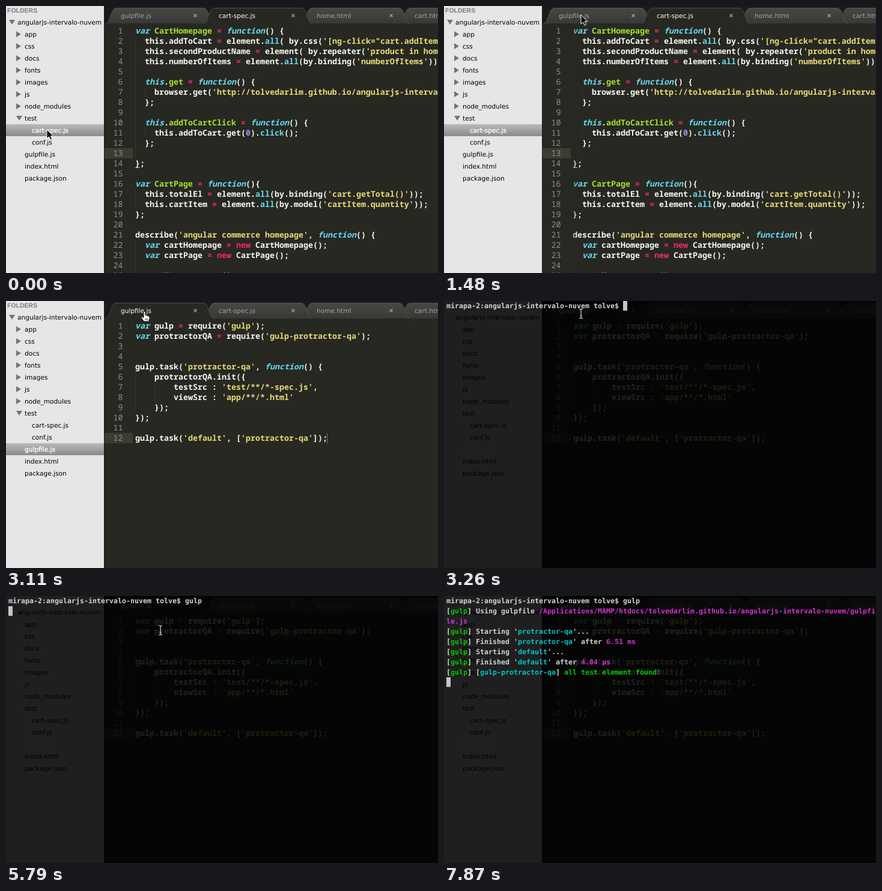
These frames come from a looping animation (719x445 px, 8 s). An HTML page:

```html
<!DOCTYPE html>
<html lang="en">
<head>
<meta charset="utf-8">
<title>Editor and terminal</title>
<style>
html, body { margin: 0; width: 100%; height: 100%; overflow: hidden; background: #272822; }
svg { display: block; }
text { white-space: pre; text-rendering: geometricPrecision; }
.ui { font: 10.6px "DejaVu Sans", sans-serif; }
.head { font: bold 10.5px "Liberation Sans", sans-serif; fill: #7b7b7b; }
.code { font: 600 13.333px "Noto Sans Mono", monospace; fill: #f8f8f2; }
.term { font: bold 11.63px "DejaVu Sans Mono", monospace; fill: #d2d2d2; }
.num { font-weight: 500; fill: #8f908a; text-anchor: end; }
.str { fill: #e6db74; }
.key { fill: #66d9ef; font-style: italic; }
.op { fill: #f92672; }
.lib { fill: #66d9ef; }
.name { fill: #a6e22e; }
.lit { fill: #ae81ff; }
.guide { stroke: #4c4d46; stroke-dasharray: 1 2; }
.green { fill: #00c800; }
.cyan { fill: #00c5c7; }
.pink { fill: #d033ce; }
</style>
</head>
<body>
<svg id="stage" width="719" height="445" viewBox="0 0 719 445"></svg>
<script>
const PROJECT = 'angularjs-intervalo-nuvem', USER = 'tolve', SITE = 'tolvedarlim.github.io';
const LOOP = 8000;

const SPEC = `var CartHomepage = function() {
  this.addToCart = element.all( by.css('[ng-click="cart.addItem(
  this.secondProductName = element( by.repeater('product in homepage
  this.numberOfItems = element.all(by.binding('numberOfItems'));

  this.get = function() {
    browser.get('http://${SITE}/${PROJECT}/
  };

  this.addToCartClick = function() {
    this.addToCart.get(0).click();
  };

};

var CartPage = function(){
  this.totalEl = element.all(by.binding('cart.getTotal()'));
  this.cartItem = element.all(by.model('cartItem.quantity'));
};

describe('angular commerce homepage', function() {
  var cartHomepage = new CartHomepage();
  var cartPage = new CartPage();

  cartHomepage.get();`;

const GULP = `var gulp = require('gulp');
var protractorQA = require('gulp-protractor-qa');


gulp.task('protractor-qa', function() {
    protractorQA.init({
        testSrc : 'test/**/*-spec.js',
        viewSrc : 'app/**/*.html'
    });
});

gulp.task('default', ['protractor-qa']);`;

const span = (cls, s) => `<tspan class="${cls}">${s}</tspan>`;
const text = (cls, x, y, s, more = '') => `<text class="${cls}" x="${x}" y="${y}" ${more}>${s}</text>`;
const rect = (x, y, w, h, fill, more = '') => `<rect x="${x}" y="${y}" width="${w}" height="${h}" fill="${fill}" ${more}/>`;
const path = (d, fill, more = '') => `<path d="${d}" fill="${fill}" ${more}/>`;

const TOKEN = /('[^']*'?)|\b(var|function|this(?=\.\w+ = function))\b|(=|\bnew\b)|\b(all|click)\b(?=\()|(\b\w+(?= = function))|\b(\d)\b/g;
const KINDS = ['str', 'key', 'op', 'lib', 'name', 'lit'];
const paint = line => line.replace(TOKEN, (s, ...m) => span(KINDS[m.slice(0, 6).findIndex(Boolean)], s));

const lineY = n => 46 + 17 * (n - 1);
const guide = ([x, from, to]) =>
  path(`M${x + .5} ${lineY(from) - 13}V${lineY(to) + 4}`, 'none', 'class="guide"');

function pane(id, source, current, guides, extra = '') {
  const lines = source.split('\n');
  const nums = lines.map((_, i) => text('code num', 194.5, lineY(i + 1), i + 1)).join('');
  const body = lines.map((s, i) => text('code', 215, lineY(i + 1), paint(s))).join('');
  return `<g id="${id}">${rect(164, lineY(current) - 13, 47, 17, '#3d3c34')}${nums}
    <g class="body">${guides.map(guide).join('')}${body}${extra}</g></g>`;
}

function tab(i, title, active) {
  const x = 166 + 163 * i;
  const shape = `M${x} 29C${x + 9} 28 ${x + 7} 3.5 ${x + 18} 3.5H${x + 162}C${x + 173} 3.5 ${x + 171} 28 ${x + 180} 29`;
  return path(shape, active ? '#272822' : 'url(#tabFill)', `stroke="${active ? '#4b4c46' : '#545452'}"`) +
    text('ui', x + 25, 20, title, `fill="${active ? '#fff' : '#a4a4a2'}"`) +
    path(`M${x + 146.5} 13.5l5 5m0-5l-5 5`, 'none', 'stroke="#a4a4a2" stroke-width="1.3"');
}

function tabs(id, active) {
  const parts = ['gulpfile.js', 'cart-spec.js', 'home.html', 'cart.html'].map((s, i) => tab(i, s, i === active));
  const front = parts.splice(active, 1);
  return `<g id="${id}">${parts.reverse().join('')}${front}</g>`;
}

// Each row: name, indent, arrow state
const ROWS = [[PROJECT, 19, 'open'],
  ...['app', 'css', 'docs', 'fonts', 'images', 'js', 'node_modules'].map(s => [s, 31, 'shut']),
  ['test', 31, 'open'], ['cart-spec.js', 43], ['conf.js', 43],
  ['gulpfile.js', 31], ['index.html', 31], ['package.json', 31]];
const rowY = i => 27 + 20 * i;

function sidebar() {
  const arrows = ROWS.map(([, x, kind], i) => {
    if (!kind) return '';
    const y = rowY(i);
    return path(kind === 'open' ? `M${x - 14} ${y - 4}h10l-5 8z` : `M${x - 14} ${y - 5}v10l8-5z`, '#747474');
  }).join('');
  const names = ROWS.map(([s, x], i) => text('ui row', x, rowY(i) + 4, s, 'stroke-width=".35"')).join('');
  return rect(0, 0, 163, 445, '#e6e6e6') + rect(163, 0, 1, 445, '#1c1c1a') + text('head', 2, 11, 'FOLDERS') +
    rect(0, 0, 163, 20, 'url(#rowFill)', 'id="pick"') + `<g id="arrows">${arrows}</g>` + names;
}

const green = s => span('green', s), cyan = s => span('cyan', s), pink = s => span('pink', s);
const PROMPT = `mirapa-2:${PROJECT} ${USER}$ `;
const LOG = [
  `Using gulpfile ${pink(`/Applications/MAMP/htdocs/${SITE}/${PROJECT}/gulpfi`)}`,
  pink('le.js'),
  `Starting '${cyan('protractor-qa')}'...`,
  `Finished '${cyan('protractor-qa')}' after ${pink('6.51 ms')}`,
  `Starting '${cyan('default')}'...`,
  `Finished '${cyan('default')}' after ${pink('4.04 µs')}`,
  `[${cyan('gulp-protractor-qa')}] ${green('all test element found!')}`
].map((s, i) => text('term', 4, 29 + 17 * i, i === 1 ? s : `[${green('gulp')}] ${s}`)).join('');

const $ = id => document.getElementById(id);
$('stage').innerHTML = `
  <defs>
    <linearGradient id="tabFill" x2="0" y2="1"><stop stop-color="#474745"/><stop offset="1" stop-color="#383836"/></linearGradient>
    <linearGradient id="rowFill" x2="0" y2="1"><stop stop-color="#b9b9b9"/><stop offset="1" stop-color="#8b8b8b"/></linearGradient>
    <linearGradient id="edge"><stop stop-color="#272822" stop-opacity=".75"/><stop offset="1" stop-color="#272822" stop-opacity="0"/></linearGradient>
  </defs>
  ${rect(164, 0, 555, 445, '#272822')}
  ${pane('spec', SPEC, 13, [[215, 2, 13], [231, 7, 7], [231, 11, 11], [215, 17, 18], [215, 22, 25]],
    rect(215, 269, 8, 1, '#c8c8c2'))}
  ${rect(211, 30, 10, 415, 'url(#edge)', 'id="shade"')}
  ${pane('gulp', GULP, 12, [[215, 6, 9], [247, 7, 8]], rect(534, 220, 1, 17, '#f8f8f0', 'id="caret"'))}
  ${rect(164, 0, 555, 29, '#1a1a19')}
  ${tabs('specTabs', 1)}${tabs('gulpTabs', 0)}
  ${sidebar()}
  <g id="terminal">
    ${rect(0, 0, 719, 445, '#000', 'opacity=".865"')}${rect(0, 0, 163, 16, '#1f1f1f')}
    ${text('term', 4, 12, '', 'id="prompt"')}
    <g id="log">${LOG}</g>
    ${rect(0, 0, 7, 16, '#c4c4c4', 'id="block"')}
  </g>
  <g id="arrow">${path('M0 0V15L3.6 11.8L6 17.2L8.6 16L6.2 10.8H11Z', '#000', 'stroke="#fff"')}</g>
  <g id="hand">${path('M-2 1V-7.5Q-.5-9.5 1-7.5V-2Q2.5-3.5 3.5-1.5Q5-2.5 6-.5Q8-1 8 1.5V4L6.5 8H-1.5L-6 1.5Q-5.5-1-2 2Z', '#fff', 'stroke="#111"')}
    ${path('M1 3V6M3 3V6M5 3V6', 'none', 'stroke="#222" stroke-width=".8"')}</g>
  <g id="beam">${path('M-3-8Q0-8 0-5.5Q0-8 3-8M0-6V6M-3 8Q0 8 0 5.5Q0 8 3 8M-1.5 3.5h3', 'none', 'stroke="#d8d8d8" stroke-width="1.2"')}</g>`;

const show = (id, on) => $(id).setAttribute('visibility', on ? 'visible' : 'hidden');
const move = (id, x, y) => $(id).setAttribute('transform', `translate(${x} ${y})`);
const mix = (a, b, p) => a + (b - a) * p;

function pointer(t) {
  if (t < 1620) {
    const step = t < 450 ? 0 : Math.min(8, Math.floor((t - 450) / 147 + .01) + 1);
    const p = step / 8, e = p * p * (3 - 2 * p);
    const x = mix(68, 228, e), y = mix(206, 15, e);
    return [x > 165 && y > 30 ? 'beam' : 'arrow', x, y];
  }
  if (t < 2960) return ['arrow', 228, 15];
  if (t < 3260) return ['hand', 231, 26];
  if (t < 3700) return ['beam', 228, 21];
  if (t < 7140) return ['beam', 257, 57];
  if (t < 7280) return ['beam', 470, 96];
  if (t < 7580) return ['beam', 640, 126];
  if (t < 7730) return ['beam', 672, 124];
  if (t < 7870) return ['beam', 705, 122];
  return [];
}

function caretAlpha(t) {
  if (t < 2070) return 1;
  if (t < 2520) return t < 2220 ? .5 : 0;
  return t < 2960 ? (t < 2670 ? .5 : 1) : t < 3110 ? .7 : .35;
}

function draw(t) {
  const gulp = t >= 1620, term = t >= 3260, scrolled = t >= 890 && !gulp;
  show('spec', !gulp);
  show('specTabs', !gulp);
  show('gulp', gulp);
  show('gulpTabs', gulp);
  show('shade', scrolled);
  document.querySelector('#spec .body').setAttribute('transform', `translate(${scrolled ? -1 : 0} 0)`);
  $('caret').setAttribute('opacity', term ? 0 : caretAlpha(t));

  const picked = gulp ? 11 : 9;
  $('pick').setAttribute('y', rowY(picked) - 10);
  show('pick', !term);
  show('arrows', !term);
  document.querySelectorAll('.row').forEach((el, i) => {
    el.setAttribute('fill', i === picked ? '#fff' : '#000');
    el.setAttribute('stroke', i === picked ? '#fff' : 'none');
  });

  show('terminal', term);
  const typed = 'gulp'.slice(0, t < 4900 ? 0 : t < 5200 ? 2 : t < 5650 ? 3 : 4);
  $('prompt').textContent = PROMPT + typed;
  show('log', t >= 6090);
  if (t < 5790) move('block', 4 + 7 * (PROMPT + typed).length, 0);
  else move('block', 4, t < 6090 ? 17 : 135.5);

  const [kind, x, y] = pointer(t);
  for (const id of ['arrow', 'hand', 'beam']) show(id, id === kind);
  if (kind) move(kind, x, y);
}

function frame() {
  draw(performance.now() % LOOP);
  requestAnimationFrame(frame);
}
frame();
</script>
</body>
</html>
```
